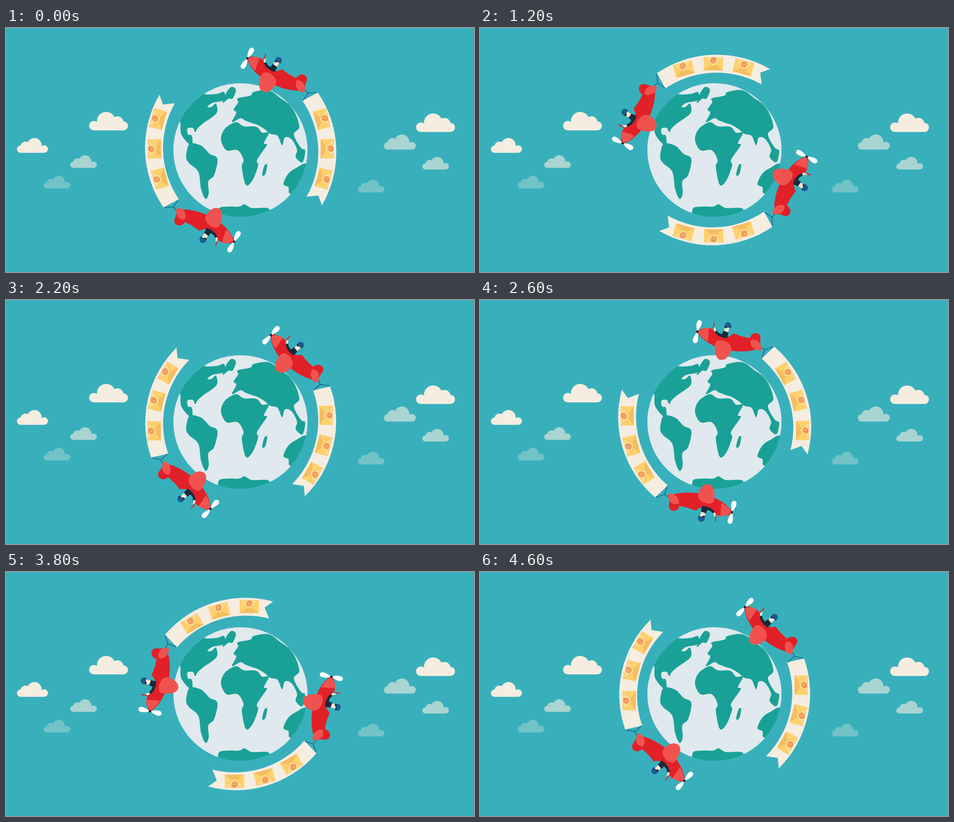
Recreate the animation shown at these times as an HTML page. Size 1034 by 541 pixels, loop 4.8 s.

```html
<!DOCTYPE html>
<html lang="en">
<head>
<meta charset="utf-8">
<title>Mail around the world</title>
<style>
html, body { margin: 0; width: 100%; height: 100%; overflow: hidden; background: #38b0bc; }
svg { display: block; width: 100vw; height: 100vh; }
text { font: bold 14.5px "Liberation Sans", Arial, sans-serif; fill: #dc4628; text-anchor: middle; }
</style>
</head>
<body>
<svg viewBox="0 0 1034 541">
  <defs>
    <clipPath id="disc"><circle cx="518" cy="270.6" r="148.4"/></clipPath>

    <path id="cloud" d="M10.5 41A10.5 10.5 0 0 1 10.5 20Q14 20 17.5 22A20.3 20.3 0 0 1 56 11.5A13.6 13.6 0 0 1 76 21A10 10 0 0 1 76 41Z"/>

    <g id="mail">
      <path fill="#ffd06c" d="M-21.3-14.3h42.6v28.6h-42.6z"/>
      <path fill="#f4bd60" d="M-21.3 14.3L0-1 21.3 14.3z"/>
      <path fill="#ffda88" stroke="#e9b65c" stroke-width=".7" d="M-21.3-14.3H21.3L5 2.5Q0 6.5-5 2.5z"/>
      <text y="-3">@</text>
    </g>

    <path id="ribbon" fill="#f5ede0" d="M655 161.3L689 143.2A234 234 0 0 1 698 393L690 371.3 664 374.2A202 202 0 0 0 655 161.3z"/>

    <path id="blade" fill="#fff" d="M701 182C695 186 688 188 682 187.8C674 187.5 674 177.5 682 176.8C689 176.5 695 179 701 181z"/>

    <g id="plane">
      <path fill="none" stroke="#15567d" stroke-width="1.4" d="M706 325L702 336M682.5 335L702 336 713.5 352.5"/>
      <path fill="#e22027" d="M702 181C709 184 715 195 716.5 206V214C707 220 704 234 706 246C710 253 715 257 719.5 260.5C717 274 717 288 718.5 297.5C726 297 733 303 733 310.5C732.5 317 727 321 718 321L704 326C690 310 680 280 679.5 246C680 221 687 194 702 181z"/>
      <path fill="#f0534f" d="M702 184C695 188 690 198 687.5 210L717 204.2C715 195 709 187 702 184z"/>
      <path fill="#f0534f" d="M714 300.5C718 306 719 314 714.5 319.5C710 325 705 328 700 328C696 325 695.5 317 699 310.5C702 304 708 301 714 300.5z"/>
      <path fill="#f0534f" d="M685 227C694 225.5 698 234 697.5 244C697 255 692 264 682 264.5C668 265 656 258 655 247C654 237 671 228 685 227z"/>
      <circle cx="732.4" cy="243.6" r="7.6" fill="#1d5c94"/>
      <path fill="#f7e7d3" d="M716 239L727 237.5 729.5 248 716 247.5zM711.5 219.5L715 215.5 721 214.5 722 217 717 219.5 714.5 222z"/>
      <path fill="#1b2a3b" d="M719 236.5L718 248.5 706 249.5C702.5 240 704 226 711.5 218.5L715.5 222C711 227 710.5 232 711.5 236z"/>
      <path stroke="#1b2a3b" stroke-width="1.3" d="M727.5 237L730.5 251"/>
      <ellipse cx="727.5" cy="239.5" rx="2" ry="2.8" fill="#1b2a3b"/>
      <path stroke="#d4252c" stroke-width="2.4" d="M718 214L730.7 212.5"/>
      <use href="#blade"/>
      <use href="#blade" transform="rotate(180 702 181.6)"/>
      <ellipse cx="702" cy="181.6" rx="3" ry="2.2" fill="#1b2a3b"/>
    </g>
  </defs>

  <rect width="1034" height="541" fill="#38b0bc"/>
  <g id="sky" fill="#f5ede0"></g>
  <g clip-path="url(#disc)">
    <circle cx="518" cy="270.6" r="148.4" fill="#e0e9ed"/>
    <g id="land" fill="#1aa197"></g>
  </g>
  <g id="orbit"></g>
</svg>
<script>
const CX = 518.5, CY = 270.5, STEP = 200, TURN = 15;
const $ = id => document.getElementById(id);

function add(parent, tag, attrs) {
  const el = document.createElementNS('http://www.w3.org/2000/svg', tag);
  for (const k in attrs) el.setAttribute(k, attrs[k]);
  return parent.appendChild(el);
}

// Closed smooth curve through a few "x,y" key points
function smooth(text) {
  const p = text.split(' ').map(s => s.split(',').map(Number));
  const n = p.length;
  let d = 'M' + p[0];
  for (let i = 0; i < n; i++) {
    const a = p[(i + n - 1) % n], b = p[i], c = p[(i + 1) % n], e = p[(i + 2) % n];
    const h1 = b.map((v, k) => v + (c[k] - a[k]) / 6);
    const h2 = c.map((v, k) => v - (e[k] - b[k]) / 6);
    d += `C${h1} ${h2} ${c}`;
  }
  return d + 'Z';
}

const lands = {
  northAmerica: '387,235 385,209 379,200 430,138 440,147 466,146 482,142 481,160 456,166 445,175 454,175 464,168 465,189 436,211 423,223 418,231 413,222 401,223 402,236 410,238 412,255 404,257',
  southAmerica: '403,260 411,255 433,262 450,279 467,290 460,326 447,340 448,366 441,379 431,357 425,319 405,300 398,286',
  greenland: '479,166 485,147 497,131 508,137 501,156 491,157',
  eurasia: '512,156 540,150 547,142 580,138 607,156 626,170 640,191 648,220 636,236 651,265 661,272 655,298 640,286 643,269 630,246 616,243 610,260 600,239 585,235 571,224 556,215 541,210 528,205 518,200 499,209 509,188 503,181 513,165',
  africa: '475,247 484,223 508,209 526,218 553,219 566,232 581,232 570,255 576,260 555,292 557,305 545,337 530,348 521,308 525,293 512,271 487,271',
  island: '571,305 577,303 573,324 566,326',
  australia: '668,303 640,311 623,324 613,346 624,353 631,368 690,360',
  antarctica: '470,401 490,396 515,396 527,391 543,399 582,402 570,440 480,430'
};
for (const name in lands) add($('land'), 'path', { d: smooth(lands[name]) });

// Small clouds are mirrored and may be faint
function cloud(x, y, size = 1, opacity = 1) {
  const place = size < 1 ? `translate(${x + 86 * size} ${y}) scale(${-size} ${size})` : `translate(${x} ${y})`;
  add($('sky'), 'use', { href: '#cloud', opacity, transform: place });
}
cloud(183.5, 186);
cloud(906, 189.5);
cloud(24, 244, .8);
cloud(835, 236, .82, .6);
cloud(141.8, 282.3, .684, .6);
cloud(919.8, 285.8, .684, .6);
cloud(83.3, 327.7, .684, .3);
cloud(777.3, 336.5, .684, .3);

// One plane with its banner; dy slides the mails along it
function flyer(angle, dy) {
  const g = add($('orbit'), 'g', { transform: `rotate(${angle} ${CX} ${CY})` });
  add(g, 'use', { href: '#ribbon' });
  for (const i of [-1, 0, 1]) {
    const a = (17 * i - 1.7) * Math.PI / 180;
    const x = 484.6 + 225 * Math.cos(a) - dy * .15, y = 274.3 + 225 * Math.sin(a) + dy;
    add(g, 'use', { href: '#mail', transform: `translate(${x} ${y}) rotate(${90 + 15 * i})` });
  }
  add(g, 'use', { href: '#plane', transform: `rotate(-60 ${CX} ${CY})` });
}
flyer(0, 0);
flyer(180, 5.2);

function draw(now) {
  const step = Math.floor(now / STEP) % (360 / TURN);
  $('orbit').setAttribute('transform', `rotate(${-TURN * step} ${CX} ${CY})`);
}

const start = performance.now();
function tick() {
  draw(performance.now() - start);
  requestAnimationFrame(tick);
}
draw(0);
requestAnimationFrame(tick);
</script>
</body>
</html>
```
